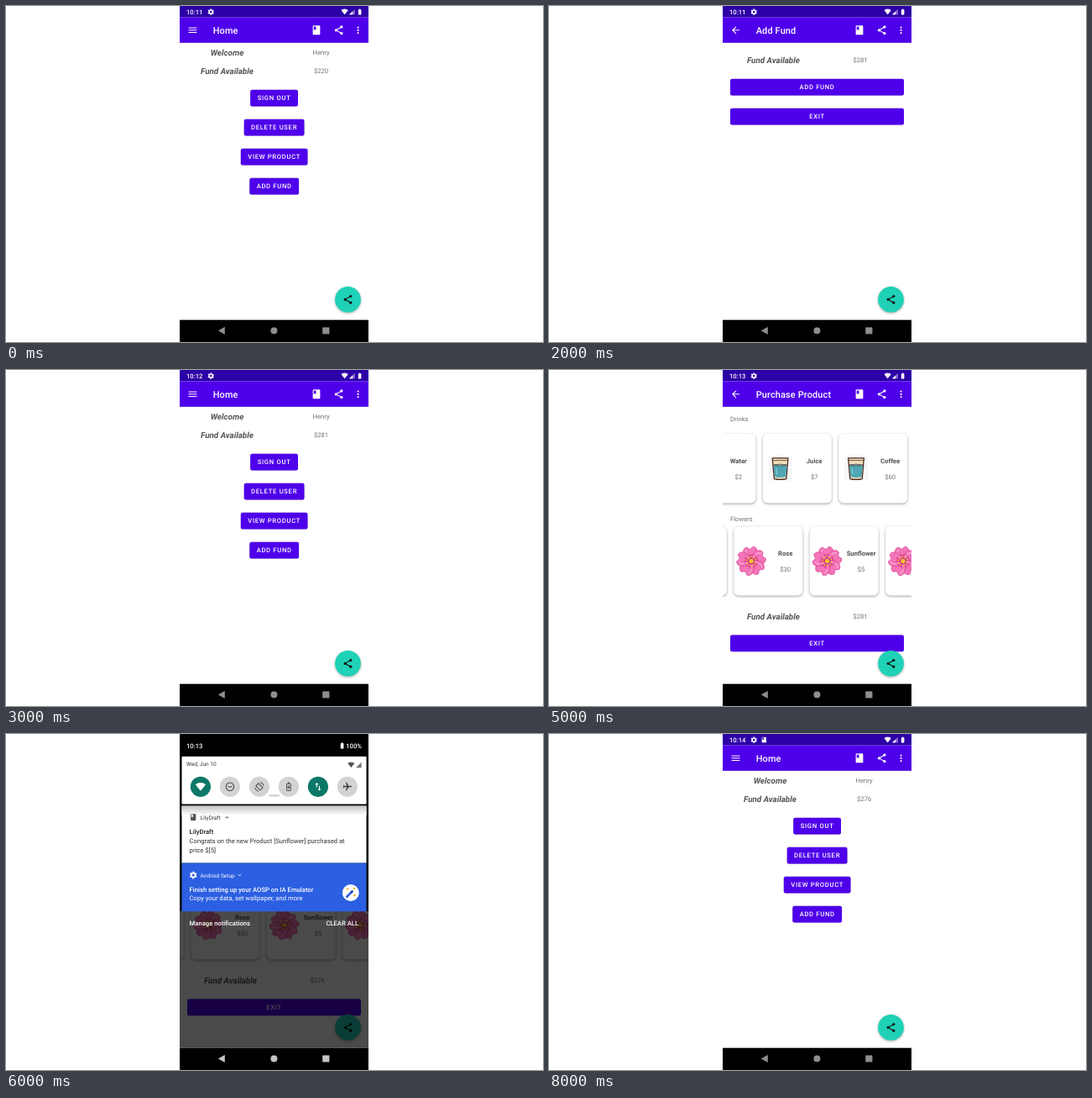
These frames come from a looping animation (640 px wide and 400 px high, 9000 ms). An HTML page:

```html
<!DOCTYPE html>
<html lang="en">
<head>
<meta charset="utf-8">
<title>Fund app walkthrough</title>
<style>
html, body { margin: 0; width: 100%; height: 100%; overflow: hidden; background: #fff; }
svg { display: block; }
text { font: 400 7.66px Roboto, sans-serif; fill: #737373; text-rendering: geometricPrecision; white-space: pre; }
.mid { text-anchor: middle; }
.head { font-size: 9.84px; font-weight: 700; font-style: italic; fill: #555; }
.title { font-size: 10.94px; font-weight: 500; letter-spacing: .0125em; fill: #fff; }
.btn { font-weight: 500; letter-spacing: .0892em; fill: #fff; }
.action { font-weight: 500; letter-spacing: .0892em; fill: #5000ee; }
.body { letter-spacing: .03125em; fill: #666; }
.name { font-weight: 700; fill: #505050; }
.clock { font-weight: 500; fill: #fff; }
.small { font-size: 6.56px; fill: #333; }
.note { fill: #333; }
.strong { font-weight: 500; fill: #222; }
.white { fill: #fff; }
.raised { filter: drop-shadow(0 .6px .6px rgba(0,0,0,.3)); }
.card { fill: #fff; filter: drop-shadow(0 1px 1.7px rgba(0,0,0,.38)); }
.float { filter: drop-shadow(0 1.8px 1.8px rgba(0,0,0,.32)); }
.scene { visibility: hidden; animation: show 9s step-end infinite; }
@keyframes show { 0% { visibility: visible; } 11.112%, 100% { visibility: hidden; } }
</style>
</head>
<body>
<svg id="stage" width="640" height="400" viewBox="0 0 640 400"></svg>
<script>
const PURPLE = '#4f00ea', TEAL = '#1fd2b7', GREEN = '#0c7868';

const paths = {
  menu: 'M3 18h18v-2H3zM3 13h18v-2H3zM3 6v2h18V6z',
  back: 'M20 11H7.83l5.59-5.59L12 4l-8 8 8 8 1.41-1.41L7.83 13H20z',
  more: 'M12 8a2 2 0 1 0 0-4 2 2 0 0 0 0 4zM12 14a2 2 0 1 0 0-4 2 2 0 0 0 0 4zM12 20a2 2 0 1 0 0-4 2 2 0 0 0 0 4z',
  book: 'M18 2H6c-1.1 0-2 .9-2 2v16c0 1.1.9 2 2 2h12c1.1 0 2-.9 2-2V4c0-1.1-.9-2-2-2zM6 4h5v8l-2.5-1.5L6 12z',
  wifi: 'M12 21.5L23.6 7C23.2 6.7 18.7 3 12 3S.8 6.7.4 7z',
  signal: 'M2 22h20V2z',
  battery: 'M15.7 4H14V2h-4v2H8.3C7.6 4 7 4.6 7 5.3v15.4c0 .7.6 1.3 1.3 1.3h7.4c.7 0 1.3-.6 1.3-1.3V5.3c0-.7-.6-1.3-1.3-1.3z',
  plane: 'M21 16v-2l-8-5V3.5a1.5 1.5 0 0 0-3 0V9l-8 5v2l8-2.5V19l-2 1.5V22l3.5-1 3.5 1v-1.5L13 19v-5.5z',
  swap: 'M16 17v-7h-2v7h-3l4 4 4-4zM9 3L5 7h3v7h2V7h3z',
  up: 'M12 8l-6 6 1.4 1.4 4.6-4.6 4.6 4.6L18 14z',
  down: 'M7.4 8.6L12 13.2l4.6-4.6L18 10l-6 6-6-6z'
};

// Icons drawn with strokes, in the same 24-unit box.
const drawn = {
  share: '<path d="M18 5L6 12l12 7" fill="none" stroke="currentColor" stroke-width="2"/>' +
    [[18, 5], [6, 12], [18, 19]].map(([x, y]) => `<circle cx="${x}" cy="${y}" r="3"/>`).join(''),
  gear: '<g fill="none" stroke="currentColor"><circle cx="12" cy="12" r="5.6" stroke-width="4"/>' +
    '<circle cx="12" cy="12" r="8.4" stroke-width="3.2" pathLength="12" stroke-dasharray="1 1" transform="rotate(15 12 12)"/></g>',
  dnd: '<circle cx="12" cy="12" r="9" fill="none" stroke="currentColor" stroke-width="2"/><path d="M7 11h10v2H7z"/>',
  rotate: '<g fill="none" stroke="currentColor" stroke-width="1.9"><rect x="8" y="5" width="8" height="14" transform="rotate(-45 12 12)"/>' +
    '<path d="M14 2a10 10 0 0 1 8 8M10 22a10 10 0 0 1-8-8"/></g>',
  saver: '<path d="M10 2h4v3h-4zM11 9h2v3h2v2h-2v3h-2v-3H9v-2h2z"/><rect x="7.5" y="5" width="9" height="16" rx="1" fill="none" stroke="currentColor" stroke-width="1.8"/>'
};

const icon = (name, x, y, color = '#fff', size = 13.1, turn = 0) =>
  `<g fill="${color}" color="${color}" transform="translate(${x} ${y}) rotate(${turn}) scale(${size / 24}) translate(-12 -12)">` +
  (drawn[name] || `<path fill-rule="evenodd" d="${paths[name]}"/>`) + '</g>';

const text = (x, y, str, cls = '') => `<text x="${x}" y="${y}" class="${cls}">${str}</text>`;

const rect = (x, y, w, h, fill, rx = 0, cls = '') =>
  `<rect x="${x}" y="${y}" width="${w}" height="${h}" rx="${rx}" fill="${fill}" class="${cls}"/>`;

const button = (x, y, w, label) =>
  rect(x, y, w, 19.7, PURPLE, 2.2, 'raised') + text(x + w / 2, y + 12.6, label, 'btn mid');

const bar = (title, nav) =>
  rect(207, 0, 225, 13.4, '#2c00a6') + rect(207, 13.4, 225, 30.4, PURPLE) +
  icon(nav, 222.5, 28.8) + text(246.7, 32.8, title, 'title') +
  icon('book', 370, 28.8) + icon('share', 396.6, 28.8) + icon('more', 419.6, 28.8);

const fab = `<circle cx="407.5" cy="349.4" r="15.4" fill="${TEAL}" class="float"/>` +
  icon('share', 407.5, 349.4, '#101010');

const status = (time, noted) =>
  text(215, 10, time, 'clock') + icon('gear', 244.2, 7, '#fff', 9) +
  (noted ? icon('book', 256.3, 7, '#fff', 8) : '') +
  icon('wifi', 403.6, 6.8, '#fff', 8.6) +
  `<g opacity=".45">${icon('signal', 412.4, 7, '#fff', 8)}</g><path d="M409 10.3h4V6.4z" fill="#fff"/>` +
  icon('battery', 421.6, 7, '#fff', 8.6);

const navBar = (color = '#8e8e8e') =>
  rect(207, 373.7, 225, 26.3, '#000') +
  `<g fill="${color}"><path d="M252.8 386.5l8-4.6v9.2z"/><circle cx="319.4" cy="386.5" r="4"/></g>` +
  rect(377.2, 382.4, 8.2, 8.2, color, .6);

const home = fund => bar('Home', 'menu') +
  text(263.5, 58.8, 'Welcome', 'head mid') + text(375.5, 58.3, 'Henry', 'mid') +
  text(263.5, 80.7, 'Fund Available', 'head mid') + text(375.5, 80, fund, 'mid') +
  button(291.2, 99.8, 56.8, 'SIGN OUT') + button(283.7, 134.8, 71.8, 'DELETE USER') +
  button(279.8, 169.8, 79.7, 'VIEW PRODUCT') + button(290.3, 204.7, 58.8, 'ADD FUND') + fab;

const fundLine = (y, fund) => text(236, y, 'Fund Available', 'head') + text(371, y - .7, fund, 'mid');

const addFund = fund => bar('Add Fund', 'back') + fundLine(67.5, fund) +
  button(216, 86.7, 207, 'ADD FUND') + button(216, 121.7, 207, 'EXIT') + fab;

const glass = `<rect x="-14" y="-15" width="28.5" height="29.5" fill="#f8f7f7"/>
  <path d="M-9.4-12.5h18.8L7.2 12.3Q0 14-7.2 12.3z" fill="#f3dfba" stroke="#4a2d25" stroke-width="1.3" stroke-linejoin="round"/>
  <path d="M-8.1-4Q0-2.6 8.1-4L6.5 10Q0 11.3-6.5 10z" fill="#4fa6b4"/>
  <path d="M-8.2-4.2Q0-6.2 8.2-4.2Q0-2-8.2-4.2z" fill="#85ccd2" stroke="#4a2d25" stroke-width=".7"/>
  <path d="M-9.2-9.6H9.2" stroke="#4a2d25" stroke-width=".8"/>
  <path d="M-4.8 0l.8 7" stroke="#8ad0d5" stroke-width="1.1"/>`;

const spin = (n, part) => Array.from({ length: n }, (_, i) => `<g transform="rotate(${i * 360 / n})">${part}</g>`).join('');

const flower = `<g transform="rotate(-6)">` +
  spin(5, `<path d="M0 0C-11-5-10-16-4-17L0-14.2 4-17C10-16 11-5 0 0z" fill="#f474b8" stroke="#d94796" stroke-width=".7"/>
    <path d="M0 0L-3.2-9 0-7 3.2-9z" fill="#d83a8c"/><path d="M-4-14.5Q-6.5-11-5-8" fill="none" stroke="#fba9d5" stroke-width="1.4"/>`) +
  spin(10, '<path d="M0 0V-5" stroke="#a91d5c" stroke-width=".6"/><circle cy="-5.4" r=".9" fill="#ffd43a"/>') +
  '<circle r="2.6" fill="#f6c32c"/></g>';

const shelf = (y, scroll, picture, items) => items.map(([name, price], i) => {
  const x = 211.3 + i * 90.4 - scroll;
  return `<rect x="${x}" y="${y}" width="82" height="82.4" rx="6" class="card"/>` +
    `<g transform="translate(${x + 20.8} ${y + 41.3})">${picture}</g>` +
    text(x + 61.4, y + 34.8, name, 'name mid') + text(x + 61.4, y + 54.2, price, 'mid');
}).join('');

const drinks = [['Water', '$2'], ['Juice', '$7'], ['Coffee', '$60']];
const flowers = [['Lily', '$10'], ['Rose', '$30'], ['Sunflower', '$5'], ['Tulip', '$8']];

const shop = (fund, drinkScroll, flowerScroll) => bar('Purchase Product', 'back') +
  text(216, 61, 'Drinks') + shelf(76, drinkScroll, glass, drinks) +
  text(216, 180, 'Flowers') + shelf(186.2, flowerScroll, flower, flowers) +
  fundLine(296.5, fund) + button(216, 315.5, 207, 'EXIT') + fab;

const dialog = rect(207, 0, 225, 373.7, 'rgba(0,0,0,.39)') +
  rect(226.3, 164.7, 186.5, 57.6, '#fff', 2.2, 'float') +
  text(239.2, 182.8, 'Fuzzy Bank decides to offer $61. Would you', 'body') +
  text(239.2, 191.6, 'want to accept', 'body') +
  text(316, 211.2, 'CANCEL', 'action') + text(361.9, 211.2, 'CONTINUE', 'action');

const tiles = [['wifi', 1], ['dnd'], ['rotate'], ['saver'], ['swap', 1], ['plane', 0, 90]];

const shade = rect(207, 0, 225, 373.7, 'rgba(0,0,0,.71)') + rect(207, 0, 225, 211, '#000') +
  text(215, 16.6, '10:13', 'clock') + icon('battery', 400.6, 13.8, '#fff', 8.6) + text(405.2, 16.6, '100%', 'clock') +
  rect(209.5, 26.8, 220, 56.6, '#fff', 1) + text(215, 38.2, 'Wed, Jun 10', 'small') +
  icon('wifi', 411.3, 36.6, '#555', 8.6) + icon('signal', 420.2, 36.8, '#777', 8) +
  tiles.map(([name, on, turn = 0], i) => {
    const x = 231.9 + i * 35;
    return `<circle cx="${x}" cy="62.8" r="12.1" fill="${on ? GREEN : '#d3d3d3'}"/>` +
      icon(name, x, 62.8, on ? '#fff' : '#444', 12.6, turn);
  }).join('') +
  rect(313, 72.2, 13.2, 2.2, '#cfcfcf', 1.1) +
  rect(209.5, 85.6, 220, 68, '#fff') + rect(209.5, 85.6, 220, 11, 'url(#fade)') +
  icon('book', 223.2, 99.2, '#555', 9.4) + text(231.6, 102, 'LilyDraft', 'small') + icon('up', 263.3, 99.4, '#333', 8) +
  text(218.6, 119.4, 'LilyDraft', 'strong') +
  text(218.6, 130, 'Congrats on the new Product [Sunflower] purchased at', 'note') +
  text(218.6, 140.6, 'price $[5]', 'note') +
  rect(209.5, 153.6, 220, 57.6, '#2c5fe1') +
  icon('gear', 223.2, 168, '#fff', 10.5) + text(231.6, 170.5, 'Android Setup', 'small white') + icon('down', 278.4, 168, '#fff', 8) +
  text(218.6, 187.6, 'Finish setting up your AOSP on IA Emulator', 'strong white') +
  text(218.6, 198.4, 'Copy your data, set wallpaper, and more', 'white') +
  '<circle cx="410.8" cy="189" r="10" fill="#fff"/>' +
  '<path d="M405.5 194.5l6.6-6.6" stroke="#2c5fe1" stroke-width="2.6"/><path d="M411.4 188.6l1.9-1.9" stroke="#153a9c" stroke-width="2.6"/>' +
  [[407, 184.6], [415, 184], [415.6, 192]].map(([x, y]) => `<path d="M${x} ${y - 1.7}l1.7 1.7-1.7 1.7-1.7-1.7z" fill="#e9b834"/>`).join('') +
  text(218.6, 227.8, 'Manage notifications', 'strong white') + text(381.4, 227.8, 'CLEAR ALL', 'strong white');

const scenes = [
  home('$220') + status('10:11') + navBar(),
  addFund('$220') + dialog + status('10:11') + navBar(),
  addFund('$281') + status('10:11') + navBar(),
  home('$281') + status('10:12') + navBar(),
  shop('$281', 0, 0) + status('10:12') + navBar(),
  shop('$281', 46.9, 81.4) + status('10:13') + navBar(),
  shop('$276', 46.9, 81.4) + shade + navBar('#c4c4c4'),
  shop('$276', 46.9, 81.4) + status('10:13', true) + navBar(),
  home('$276') + status('10:14', true) + navBar()
];

document.getElementById('stage').innerHTML =
  `<defs><clipPath id="screen"><rect x="207" width="225" height="400"/></clipPath>
  <linearGradient id="fade" x2="0" y2="1"><stop stop-color="#c4c4c4"/><stop offset="1" stop-color="#fff"/></linearGradient></defs>
  <g clip-path="url(#screen)">` +
  scenes.map((s, i) => `<g class="scene" style="animation-delay:${i - scenes.length}s">${rect(207, 0, 225, 400, '#fff')}${s}</g>`).join('') +
  '</g>';
</script>
</body>
</html>
```
